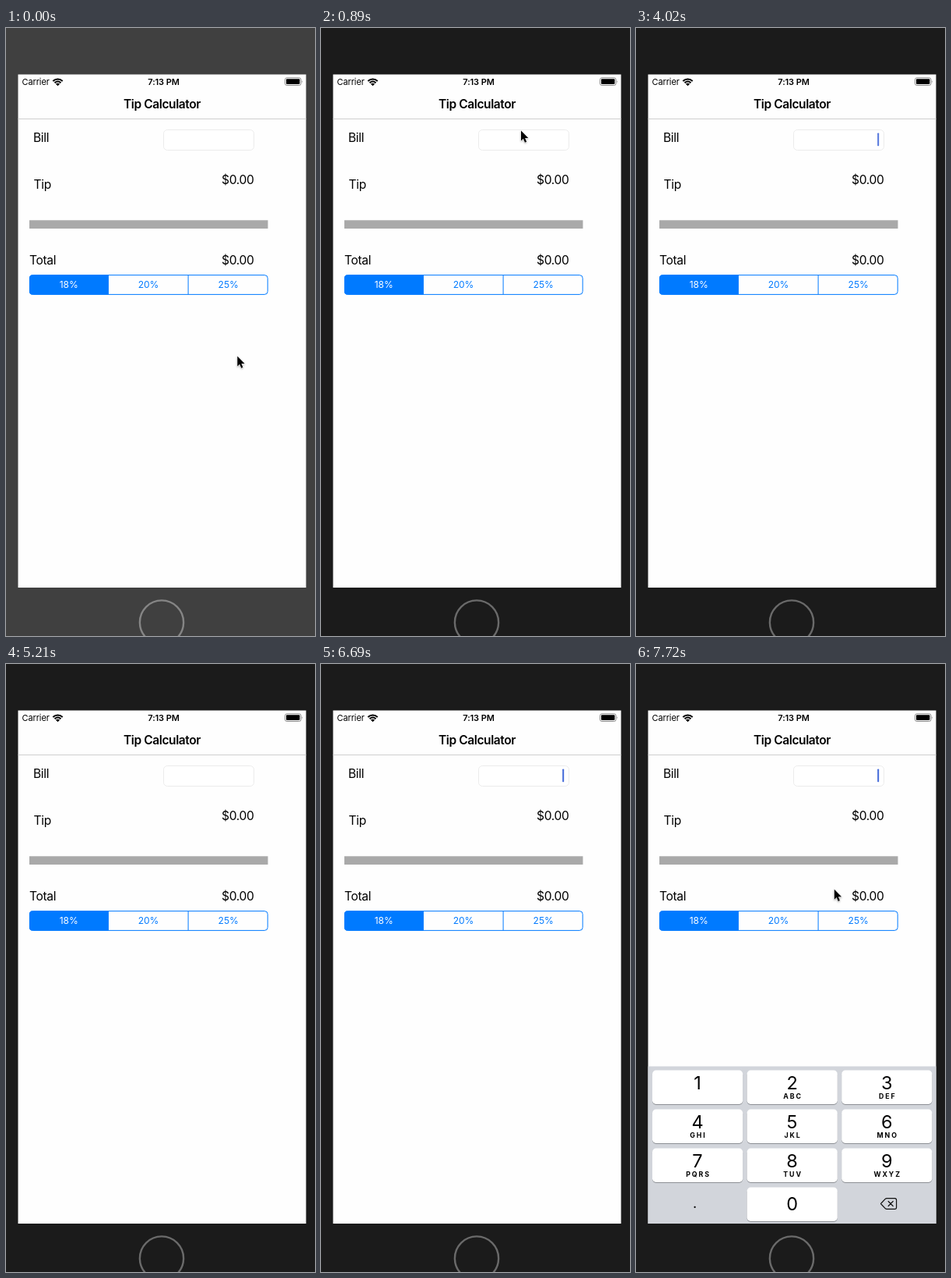
An HTML page for the animation above (8000 ms loop, 397 by 779 pixels).

```html
<!DOCTYPE html>
<html lang="en">
<head>
<meta charset="utf-8">
<title>Tip Calculator</title>
<style>
  html, body { margin: 0; width: 100%; height: 100%; overflow: hidden; background: #1b1b1b; }
  svg { display: block; width: 397px; height: 779px; }
  text { font-family: Inter, "DejaVu Sans", sans-serif; fill: #000; white-space: pre; }
  .label { font-size: 15.6px; letter-spacing: -.35px; }
  .title { font-size: 15.5px; font-weight: 600; letter-spacing: -.4px; }
  .status { font-size: 11px; letter-spacing: -.1px; }
  .seg { font-size: 12px; fill: #007aff; }
  .item { font-size: 14.2px; fill: #262626; }
  .digit { font-size: 23.5px; }
  .letters { font-size: 8.8px; font-weight: 700; letter-spacing: 1.9px; }
  .mid { text-anchor: middle; }
  .end { text-anchor: end; }
  .picked { fill: #fff; }
  #menu { filter: drop-shadow(0 3px 4px rgba(0, 0, 0, .22)); }
</style>
</head>
<body>
<svg viewBox="0 0 397 779">
  <defs>
    <clipPath id="screen"><rect x="15.5" y="59.5" width="370" height="657.5"/></clipPath>
    <clipPath id="wedge"><path d="M66.5 74.2L57 64.7V60H76V64.7Z"/></clipPath>
    <linearGradient id="glass" gradientUnits="userSpaceOnUse" x1="0" x2="75" y1="0" y2="0">
      <stop stop-color="#dcdcdc"/><stop offset="1" stop-color="#efefef"/>
    </linearGradient>
    <linearGradient id="blue" gradientUnits="userSpaceOnUse" x1="0" x2="75" y1="0" y2="0">
      <stop stop-color="#1f7df0"/><stop offset="1" stop-color="#3890fa"/>
    </linearGradient>
  </defs>

  <rect id="bezel" width="397" height="779"/>
  <circle id="home" cx="200" cy="761.5" r="28.1" fill="none" stroke-width="2.4"/>

  <g clip-path="url(#screen)">
    <rect x="15" y="59" width="371" height="659" fill="#fefefe"/>
    <path d="M15 116.5H386" stroke="#cfcfcf"/>

    <text class="status" x="20.5" y="73">Carrier</text>
    <g clip-path="url(#wedge)" fill="none" stroke="#000" stroke-width="2">
      <circle cx="66.5" cy="74" r="8.6"/><circle cx="66.5" cy="74" r="5.4"/>
      <circle cx="66.5" cy="74" r="1.6" stroke-width="3.2"/>
    </g>
    <text class="status mid" x="202.5" y="73" font-weight="600">7:13 PM</text>
    <rect x="358.5" y="63.8" width="20.5" height="9.7" rx="2.4" fill="none" stroke="#8c8c8c"/>
    <rect x="360" y="65.2" width="17.4" height="6.9" rx="1"/>
    <path d="M380.2 67.2q1.6 1.4 0 3Z" fill="#8c8c8c"/>

    <text class="title mid" x="200.5" y="102.5">Tip Calculator</text>
    <text class="label" x="35" y="146">Bill</text>
    <text class="label" x="35.5" y="205.8">Tip</text>
    <text class="label" x="30" y="303">Total</text>
    <text class="label end" x="318.5" y="200.3">$0.00</text>
    <text class="label end" x="318.5" y="303.3">$0.00</text>

    <rect x="202.5" y="130.5" width="116" height="26" rx="4.8" fill="#fff" stroke="#ebebeb"/>
    <rect id="caret" x="310.2" y="134.5" width="2" height="16.8" rx=".8" fill="#4269d9"/>
    <rect x="30" y="246.3" width="306.5" height="10.7" fill="#a9a9a9"/>

    <path d="M131.4 316.5H34a4 4 0 0 0-4 4V337.5a4 4 0 0 0 4 4H131.4Z" fill="#007aff"/>
    <rect x="30.4" y="316.6" width="305.8" height="24.8" rx="4" fill="none" stroke="#007aff"/>
    <path d="M131.4 317V341M234.1 317V341" stroke="#007aff"/>
    <text class="seg mid picked" x="80.7" y="333.2">18%</text>
    <text class="seg mid" x="183" y="333.2">20%</text>
    <text class="seg mid" x="285.7" y="333.2">25%</text>

    <g id="pad">
      <rect x="15" y="515.5" width="371" height="204" fill="#d2d5db"/>
      <g id="keys"></g>
      <text class="mid" x="75.5" y="697" font-size="18">.</text>
      <g fill="none" stroke="#111" stroke-width="1.2" stroke-linecap="round" stroke-linejoin="round">
        <path d="M314.5 691.5L320.5 685.2Q321.2 684.6 322 684.6H332.5Q334.6 684.6 334.6 686.7V696.3Q334.6 698.4 332.5 698.4H322Q321.2 698.4 320.5 697.8Z"/>
        <path d="M324.2 688.5L330.2 694.5M330.2 688.5L324.2 694.5"/>
      </g>
    </g>
  </g>

  <g id="menu">
    <rect x="-20" y="367.3" width="135.5" height="97.5" rx="5" fill="url(#glass)" stroke="#bdbdbd" stroke-width=".6"/>
    <path d="M0 397.5H115" stroke="#d2d2d2" stroke-width="1.5"/>
    <rect id="highlight" x="-1" width="116.4" height="19" fill="url(#blue)"/>
    <text class="item end" x="58.5" y="386">to Device</text>
    <text class="item end" x="80.5" y="417">Keyboard Language as vumOS</text>
    <text class="item end" id="hardware" x="105.5" y="436.3">⇧⌘K</text>
    <text class="item end" id="software" x="105.5" y="455.3">⌘K</text>
  </g>

  <path id="cursor" d="M0 0V13L2.9 10.3L5 15.2L7.1 14.3L5.1 9.5H9.3Z" stroke="#fff"
        paint-order="stroke" style="filter:drop-shadow(0 1px 1px rgba(0,0,0,.3))"/>
</svg>
<script>
const LOOP = 8000;
const TICK = 148.7;
const BLINK = 6.6, BLINK_OFF = 2.85, FADE = .85; // caret rhythm, in ticks
const PAD_HEIGHT = 202;

const el = id => document.getElementById(id);
const set = (id, attributes) => {
  for (const [name, value] of Object.entries(attributes)) el(id).setAttribute(name, value);
};
const clamp = v => Math.min(1, Math.max(0, v));
const shown = on => on ? 'visible' : 'hidden';

const key = (col, row, digit, letters) => {
  const x = 21 + 121.6 * col, y = 520.5 + 50 * row, cx = x + 58;
  const cap = (top, fill) => `<rect x="${x}" y="${top}" width="116.2" height="43.5" rx="4.8" fill="${fill}"/>`;
  return cap(y + 1, '#8d9095') + cap(y, '#fff') +
    `<text class="digit mid" x="${cx}" y="${y + (letters === null ? 29.5 : 24)}">${digit}</text>
     <text class="letters mid" x="${cx + 1}" y="${y + 36.3}">${letters ?? ''}</text>`;
};
el('keys').innerHTML = [' ', ...'ABC DEF GHI JKL MNO PQRS TUV WXYZ'.split(' ')]
  .map((letters, i) => key(i % 3, Math.floor(i / 3), i + 1, letters)).join('') + key(1, 3, 0, null);

// Pointer stops: tick, x, y
const stops = [[0, 297.3, 420.5], [1, 362, 59], [3, 362, 59], [6, 257, 131.5], [8, 257, 139], [49, 90, 380], [52, 254.8, 288.8]];

function pointer(tick) {
  const next = stops.findIndex(([start]) => start > tick);
  if (next < 0) return stops.at(-1).slice(1);
  const [a, ...from] = stops[next - 1], [b, ...to] = stops[next];
  const ease = Math.sin((tick - a) / (b - a) * Math.PI / 2);
  return from.map((v, i) => v + (to[i] - v) * ease);
}

function caret(tick) {
  const firstOff = 13.65;
  if (tick < firstOff) return clamp((tick - 7.5) / FADE);
  const phase = (tick - firstOff) % BLINK;
  return phase < BLINK_OFF ? clamp(1 - phase / FADE / 2) * (phase < FADE) : clamp((phase - BLINK_OFF) / FADE);
}

// Critically damped slide of the keypad
function padDrop(tick) {
  const s = Math.max(0, tick - 45.2) * 2.65;
  return tick >= 48 ? 0 : PAD_HEIGHT * (1 + s) * Math.exp(-s);
}

function draw(t) {
  const tick = Math.floor(t / TICK + .1);
  const focused = tick >= 3;
  set('bezel', { fill: focused ? '#1b1b1b' : '#404040' });
  set('home', { stroke: focused ? '#6a6a6a' : '#858585' });
  set('cursor', { visibility: shown(tick < 14 || tick >= 50), transform: `translate(${pointer(tick)})` });
  set('caret', { opacity: caret(tick) });
  set('pad', { transform: `translate(0 ${padDrop(tick)})` });

  const picked = tick >= 38 && tick < 41 ? 'hardware' : tick >= 41 && tick < 43 ? 'software' : '';
  set('menu', { opacity: tick < 37 ? 0 : clamp((45 - tick) / 2) });
  set('highlight', { visibility: picked ? 'inherit' : 'hidden', y: picked === 'software' ? 441 : 422 });
  for (const id of ['hardware', 'software']) el(id).classList.toggle('picked', id === picked);
}

const begin = performance.now();
function frame() {
  draw((performance.now() - begin) % LOOP);
  requestAnimationFrame(frame);
}
frame();
</script>
</body>
</html>
```
